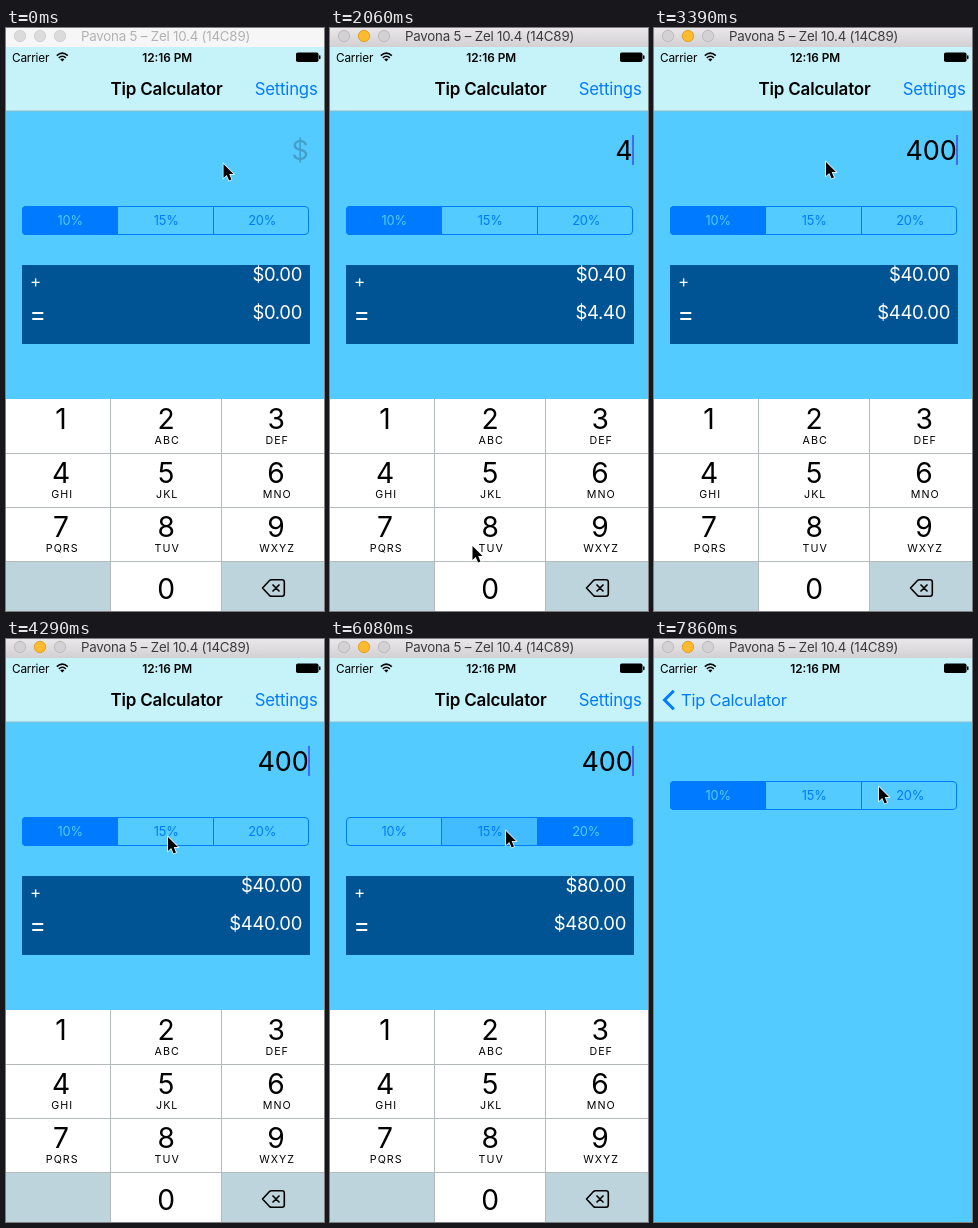
Write an HTML page that moves like this. It is 318x583 px and loops after 8000 ms.

```html
<!DOCTYPE html>
<html lang="en">
<head>
<meta charset="utf-8">
<title>Tip Calculator</title>
<style>
html, body { margin: 0; width: 100%; height: 100%; overflow: hidden; }
svg { display: block; width: 318px; height: 583px; background: #54cbff; }
text { font-family: Inter, Roboto, sans-serif; white-space: pre; }
</style>
</head>
<body>
<svg id="stage" viewBox="0 0 318 583"></svg>
<script>
const BLUE = '#007aff', SKY = '#54cbff', GREY = '#bdd4dc';

const text = (str, x, y, size, { id, anchor = 'middle', weight = 400, fill = '#000', gap = -.2 } = {}) =>
  `<text ${id ? `id="${id}"` : ''} x="${x}" y="${y}" font-size="${size}" font-weight="${weight}" fill="${fill}"
    text-anchor="${anchor}" letter-spacing="${gap}">${str}</text>`;
const rect = (x, y, w, h, fill, more = '') =>
  `<rect x="${x}" y="${y}" width="${w}" height="${h}" fill="${fill}" ${more}/>`;
const line = (d, stroke, width = 1, more = '') =>
  `<path d="${d}" fill="none" stroke="${stroke}" stroke-width="${width}" ${more}/>`;
const three = make => [0, 1, 2].map(make).join('');

const segments = name =>
  `<g clip-path="url(#pill)">${three(i => rect(16 + 96 * i, 178, 96, 29, BLUE, `id="${name}${i}"`))}</g>` +
  rect(16.5, 178.5, 286, 28, 'none', `rx="3.5" stroke="${BLUE}"`) +
  line('M111.5 178V207M207.5 178V207', BLUE) +
  three(i => text(10 + 5 * i + '%', 64.2 + 96 * i, 197, 12.8, { id: `${name}Label${i}`, fill: BLUE }));

function keypad() {
  const letters = ['', 'ABC', 'DEF', 'GHI', 'JKL', 'MNO', 'PQRS', 'TUV', 'WXYZ'];
  const keys = letters.map((word, i) => {
    const x = 55 + 107.5 * (i % 3) - (i % 3 === 1 ? 2.5 : 0), y = 400.5 + 54 * Math.floor(i / 3);
    return text(i + 1, x, y, 28.2) + text(word, x + 1.2, y + 15.7, 10.7, { gap: 1 });
  });
  return rect(0, 371, 318, 212, '#fff') + rect(0, 533, 105, 50, GREY) + rect(216, 533, 102, 50, GREY) +
    rect(0, 426, 105, 53, GREY, 'id="key4"') + rect(105, 533, 111, 50, GREY, 'id="key0"') +
    keys.join('') + text('0', 160, 570.5, 28.2) +
    line('M0 425.5H318M0 479.5H318M0 533.5H318M104.5 371V583M215.5 371V583', '#b4b9bc') +
    line('M256.5 560L263.5 552.5Q264.5 551.8 265.5 551.8H276Q278.3 551.8 278.3 554V566Q278.3 568.2 276 568.2H265.5Q264.5 568.2 263.5 567.5Z' +
      'M266.5 556.5L273.5 563.5M273.5 556.5L266.5 563.5', '#000', 1.6, 'stroke-linejoin="round"');
}

const white = { fill: '#fff' }, amount = { fill: '#fff', anchor: 'end', gap: -.35 };
const stage = document.getElementById('stage');
stage.innerHTML = `
<defs>
  <clipPath id="pill"><rect x="16" y="178" width="287" height="29" rx="4"/></clipPath>
  <linearGradient id="chrome" x2="0" y2="1"><stop stop-color="#e9e7e9"/><stop offset="1" stop-color="#d2d0d2"/></linearGradient>
</defs>
<g id="main">
  ${text('$', 302.5, 131.5, 27, { id: 'value', anchor: 'end' })}
  ${rect(302, 107, 2, 30, '#426bf2', 'id="caret"')}
  ${segments('rate')}
  ${rect(16, 237, 288, 79, '#005493')}
  ${text('+', 29.5, 258.5, 17, white)}${text('=', 31.7, 295, 25, white)}
  ${text('', 296, 253, 18.5, { ...amount, id: 'tip' })}${text('', 296, 291, 18.5, { ...amount, id: 'total' })}
</g>
<g id="pad">${keypad()}</g>
<g id="prefs">${rect(0, 83, 318, 500, SKY)}<g transform="translate(0 -36)">${segments('pref')}</g></g>
${rect(0, 18, 318, 65, '#c6f3f9')}${rect(0, 82.5, 318, 1, '#8dbccb')}
${text('Tip Calculator', 160.5, 67, 17, { id: 'heading', weight: 600 })}
${text('Settings', 311.5, 67, 16.7, { id: 'settings', anchor: 'end', fill: BLUE })}
<g id="back">
  ${line('M19.8 51.8L10.5 61L19.8 70.2', BLUE, 3)}
  ${text('Tip Calculator', 27, 67, 16.5, { anchor: 'start', fill: BLUE })}
</g>
${text('Carrier', 6, 33.5, 11.8, { anchor: 'start' })}
${line('M50.8 27.6Q56.3 22.6 61.8 27.6M52.8 29.8Q56.3 26.7 59.8 29.8', '#000', 1.6)}
<path d="M54.2 31.3Q56.3 29.6 58.4 31.3L56.3 33.6Z"/>
${text('12:16 PM', 161.2, 33.5, 11.8, { weight: 600, gap: 0 })}
${rect(290, 24.5, 22.5, 9.5, '#000', 'rx="1.8"')}${rect(313, 27.3, 1.5, 4, '#000', 'rx=".7"')}
${rect(0, 0, 318, 19, '#f6f6f6', 'id="bar"')}
${three(i => `<circle id="dot${i}" cx="${14 + 20 * i}" cy="8" r="5.7"/>`)}
${text('Pavona 5 – Zel 10.4 (14C89)', 159.5, 13, 13.3, { id: 'caption' })}
<path id="cursor" d="M0 0V14L3.2 11L5.6 16.5L8 15.4L5.7 10.1H10Z" stroke="#fff" stroke-width="1.4" paint-order="stroke"/>`;

const el = {};
stage.querySelectorAll('[id]').forEach(node => el[node.id] = node);

// Time runs in ticks, as in a screen recording of about seven pictures a second.
const LOOP = 8000, TICK = 148.2, LEAD = 19;
const ACTIVE = 12, SETTINGS = 48, PUSH = 49.8;
const taps = [[ACTIVE, '4'], [16, '0'], [19, '0']];   // tick, key
const picks = [[31, 1], [35, 2], [41, 1]];            // tick, segment
const glides = [                                      // leave, arrive, x, y
  [0, 0, 217.5, 136], [0, 1, 206, 193], [1, 3, 292, 96], [4, 7, 77.5, 409],
  [7, 11, 59, 463], [12, 14, 142.5, 518], [14, 16, 151, 554], [20, 23, 172, 134],
  [25, 29, 162, 198], [32, 34, 246, 201], [36, 39, 176, 192], [43, 46, 290, 57], [50, 53, 225, 148],
];

const clamp = u => Math.min(1, Math.max(0, u));
const smooth = u => u * u * (3 - 2 * u);
const easeOut = u => 1 - (1 - u) ** 2;
const money = n => '$' + n.toFixed(2);
const set = (id, attrs) => Object.entries(attrs).forEach(([k, v]) => el[id].setAttribute(k, v));
const move = (id, x, y = 0) => set(id, { transform: `translate(${x} ${y})` });

// A press shows for one tick and takes effect on the next.
const done = (events, n) => events.filter(e => e[0] < n).map(e => e[1]);
const held = (events, n) => events.find(e => e[0] === n)?.[1];

function pointer(n) {
  let [, , x, y] = glides[0];
  for (const [leave, arrive, toX, toY] of glides.slice(1)) {
    const u = smooth(clamp((n - leave) / (arrive - leave)));
    x += (toX - x) * u;
    y += (toY - y) * u;
  }
  return [x, y];
}

function showRate(name, chosen, pressed) {
  for (let i = 0; i < 3; i++) {
    set(name + i, { opacity: i === chosen ? 1 : i === pressed ? .2 : 0 });
    set(`${name}Label${i}`, { fill: i === chosen ? SKY : BLUE });
  }
}

function showBill(n) {
  const value = done(taps, n).join(''), rate = done(picks, n).pop() ?? 0;
  const bill = Number(value), tip = bill * (10 + 5 * rate) / 100;
  el.value.textContent = value || '$';
  set('value', { fill: value ? '#000' : '#439fc9' });
  el.tip.textContent = money(tip);
  el.total.textContent = money(bill + tip);
  set('caret', { opacity: value && (n + 13) % 6.66 < 3.2 ? 1 : 0 });
  showRate('rate', rate, held(picks, n));
  for (const key of '40') set('key' + key, { opacity: held(taps, n) === key ? 1 : 0 });
}

function showPush(n) {
  const push = easeOut(clamp((n - PUSH) / 2.5));
  const dim = n >= SETTINGS && n < PUSH ? .2 : 1;
  move('main', -95 * push);
  move('pad', -318 * push);
  move('prefs', 318 * (1 - push));
  move('heading', -80 * push);
  move('back', 80 * (1 - push));
  set('heading', { opacity: 1 - push });
  set('back', { opacity: push });
  set('settings', { opacity: (1 - push) * dim });
}

function showWindow(active) {
  set('bar', { fill: active ? 'url(#chrome)' : '#f6f6f6' });
  set('caption', { fill: active ? '#3c3c3c' : '#b2b2b2' });
  for (let i = 0; i < 3; i++) {
    const [fill, stroke] = !active ? ['#dcdcdc', '#d2d2d2'] : i === 1 ? ['#fdbc2f', '#e0a028'] : ['#d3d1d3', '#bdbbbd'];
    set('dot' + i, { fill, stroke });
  }
}

const start = performance.now();
function loop() {
  const n = Math.floor(((performance.now() - start) % LOOP + LEAD) / TICK);
  showWindow(n >= ACTIVE);
  showBill(n);
  showPush(n);
  move('cursor', ...pointer(n));
  requestAnimationFrame(loop);
}
showRate('pref', 0);
loop();
</script>
</body>
</html>
```
